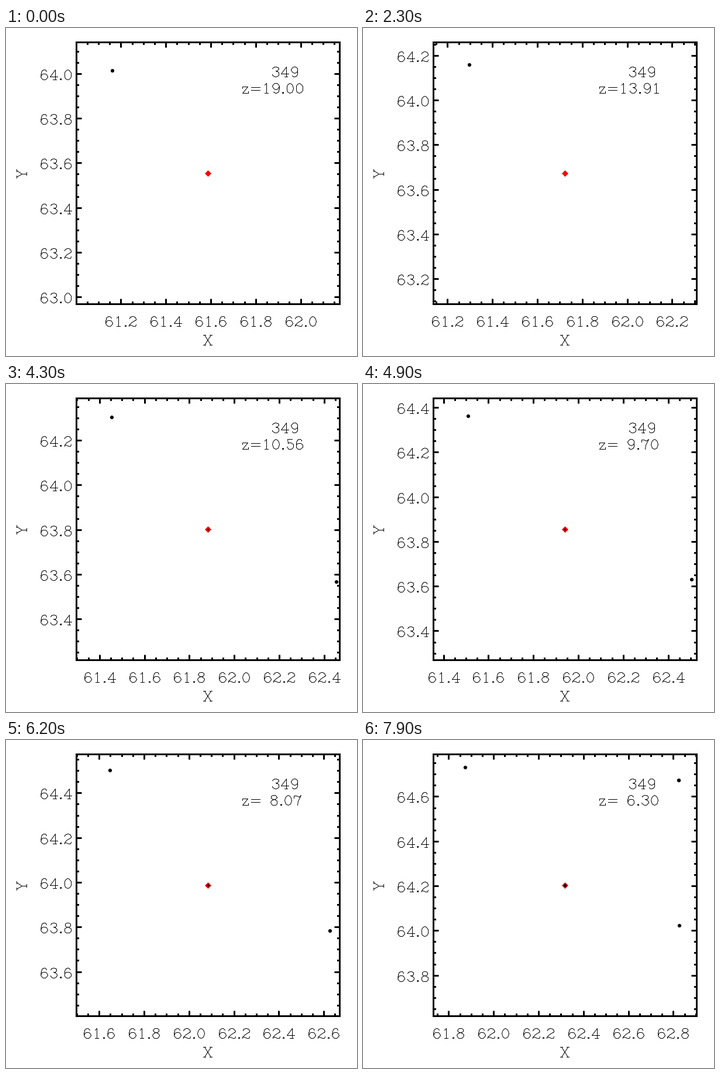
Animation of 600x560 px, one loop 8 s. Source, as a matplotlib script:

```python
import numpy as np
import matplotlib.pyplot as plt
from matplotlib.animation import FuncAnimation
from matplotlib.collections import LineCollection
from matplotlib.patches import Circle, Polygon, Rectangle

W, H, DPI = 600, 560, 100
FRAMES, STEP = 80, 100
PX = 72 / DPI
LEFT, RIGHT, TOP, BOTTOM = 120.5, 570.5, 24.5, 471.5
CX, CY = 345.5, 248.5
SPAN = 1.172  # data range shown on both axes
UNIT = 0.805  # pixels per lettering unit


# ---- stroke lettering: x from the glyph centre, y up from the baseline ----
def oval(cx, cy, rx, ry, a=0, b=360):
    t = np.radians(np.linspace(a, b, 17))
    return np.column_stack([cx + rx * np.cos(t), cy + ry * np.sin(t)])


def bar(x0, x1, y):
    return [(x0, y), (x1, y)]


def turn(strokes):
    return [np.array([0, 21]) - s for s in strokes]


glyphs = {" ": [], ".": [oval(0, 1, 1, 1)], "=": [bar(-9, 9, 12), bar(-9, 9, 6)]}
glyphs["0"] = [oval(0, 10.5, 7, 10.5)]
glyphs["1"] = [[(-4, 17), (0, 21), (0, 0)], bar(-4, 4, 0)]
glyphs["2"] = [oval(0, 15.5, 7, 5.5, 170, -40), [(5.4, 12), (-3, 8), (-7, 3), (-7, 0)],
               [(-7, 2), (-4, 3), (2, 0), (6, 0), (7, 4)]]
glyphs["3"] = [oval(0, 16.5, 6.5, 4.5, 170, -90), oval(0, 6, 7, 6, 90, -170)]
glyphs["4"] = [[(3, 0), (3, 21), (-8, 6), (8, 6)], bar(-1, 6, 0)]
glyphs["5"] = [oval(0, 7, 7, 7, 130, -165), [(-4.5, 12.4), (-5, 21), (5, 21)]]
glyphs["6"] = [oval(0, 6.5, 7, 6.5), oval(0, 10.5, 7, 10.5, 45, 200)]
glyphs["7"] = [[(-7, 15), (-7, 20), (-2, 20), (3, 18), (7, 21), (1, 9), (0, 0)]]
glyphs["8"] = [oval(0, 16.5, 6, 4.5), oval(0, 6, 7, 6)]
glyphs["9"] = turn(glyphs["6"])
glyphs["z"] = [[(-6, 10), (-6, 14), (5, 14), (-6, 0), (6, 0), (6, 4)]]
serifs = [bar(-9, -4, 21), bar(4, 9, 21)]
glyphs["X"] = [[(-7, 21), (7, 0)], [(7, 21), (-7, 0)]] + serifs + turn(serifs)
glyphs["Y"] = [[(-7, 21), (0, 10), (0, 0)], [(7, 21), (0, 10)], bar(-3, 3, 0)] + serifs
advance = {" ": 16, ".": 10, "=": 26, "z": 18}


def letter(text, x, y, align=0.0, upright=True):
    """Pixel strokes of text; align 0 is left, 0.5 centre, 1 right."""
    widths = [advance.get(c, 20) for c in text]
    pen = -align * sum(widths)
    out = []
    for c, w in zip(text, widths):
        for s in glyphs[c]:
            u, v = np.asarray(s, float).T * UNIT
            u = u + (pen + w / 2) * UNIT
            pts = (x + u, y - v) if upright else (x - v, y - u)
            out.append(np.floor(np.column_stack(pts) + 0.5) + 0.5)
        pen += w
    return out


# ---- motion ----
def grow(a, b, rate):
    """Exponential growth from a to b over the loop."""
    return lambda i: a + (b - a) * np.expm1(rate * i) / np.expm1(rate * (FRAMES - 1))


def ease(a, b, power=1.0):
    return lambda i: a + (b - a) * (i / (FRAMES - 1)) ** power


mid_x = grow(61.587, 62.317, 0.0144)
drift_y = grow(63.555, 64.204, 0.0155)
log_z = ease(np.log(20.0), np.log(7.3))
paths = [
    (ease(182, 175, 2.7), ease(73, 47, 0.8)),
    (ease(575, 541, 2), ease(375, 317, 0.72)),
    (ease(745, 540), ease(14, 69)),
    (ease(769, 540), ease(22, 69)),
]


def mid_y(i):
    wobble = np.interp(i, [0, 23, 43, 56, 79], [0, 0.003, -0.008, -0.004, 0])
    return drift_y(i) + wobble


# ---- stage ----
fig = plt.figure(figsize=(W / DPI, H / DPI), dpi=DPI, facecolor="white")
ax = fig.add_axes([0, 0, 1, 1])
ax.set_xlim(0, W)
ax.set_ylim(H, 0)
ax.axis("off")


def lines(width, cap):
    c = LineCollection([], colors="black", linewidths=width * PX, capstyle=cap, snap=False)
    return ax.add_collection(c, autolim=False)


ticks, words = lines(3, "butt"), lines(1, "projecting")
box = (LEFT, TOP), RIGHT - LEFT, BOTTOM - TOP
window = Rectangle(*box, transform=ax.transData)
R = 5.5
ax.add_patch(Polygon([(CX, CY - R), (CX + R, CY), (CX, CY + R), (CX - R, CY)],
                     color="red", lw=0, zorder=3))
core = ax.add_patch(Circle((CX, CY), 0, color="#200000", lw=0, zorder=4))
dots = []
for _ in paths:
    dot = ax.add_patch(Circle((0, 0), 3.1, color="black", lw=0, zorder=3))
    dot.set_clip_path(window)
    dots.append(dot)
ax.add_patch(Rectangle(*box, fill=False, ec="black", lw=3 * PX, joinstyle="miter",
                       snap=False, zorder=5))
fixed = (letter("349", 452.5, 83, 0) + letter("X", 344.5, 541, 0.5)
         + letter("Y", 35, 248.5, 0.5, upright=False))


def scale(mid):
    """Tick values in view, in steps of 0.05, as (value, is_major, 0..1)."""
    lo = mid - SPAN / 2
    for k in range(int(np.ceil(lo * 20)), int(np.floor((lo + SPAN) * 20)) + 1):
        yield k / 20, k % 4 == 0, (k / 20 - lo) / SPAN


def update(i):
    marks, text = [], list(fixed)
    for value, major, f in scale(mid_x(i)):
        x, n = np.floor(LEFT + f * (RIGHT - LEFT)) + 0.5, 9 if major else 4.5
        marks += [[(x, TOP), (x, TOP + n)], [(x, BOTTOM), (x, BOTTOM - n)]]
        if major:
            text += letter(f"{value:.1f}", x - 0.5, 509, 0.5)
    for value, major, f in scale(mid_y(i)):
        y, n = np.floor(BOTTOM - f * (BOTTOM - TOP)) + 0.5, 9 if major else 4.5
        marks += [[(LEFT, y), (LEFT + n, y)], [(RIGHT, y), (RIGHT - n, y)]]
        if major:
            text += letter(f"{value:.1f}", 113.4, y + 9.5, 1)
    text += letter(f"z={np.expm1(log_z(i)):5.2f}", 401.5, 111)
    ticks.set_segments(marks)
    words.set_segments(text)
    for dot, (px, py) in zip(dots, paths):
        dot.center = np.floor(px(i) + 0.5), np.floor(py(i) + 0.5)
    core.set_radius(0 if i < 34 else ease(0.4, 2.7)(i))
    return [ticks, words, core, *dots]


anim = FuncAnimation(fig, update, frames=FRAMES, interval=STEP, repeat=True,
                     repeat_delay=0, blit=False)
plt.show()
```
